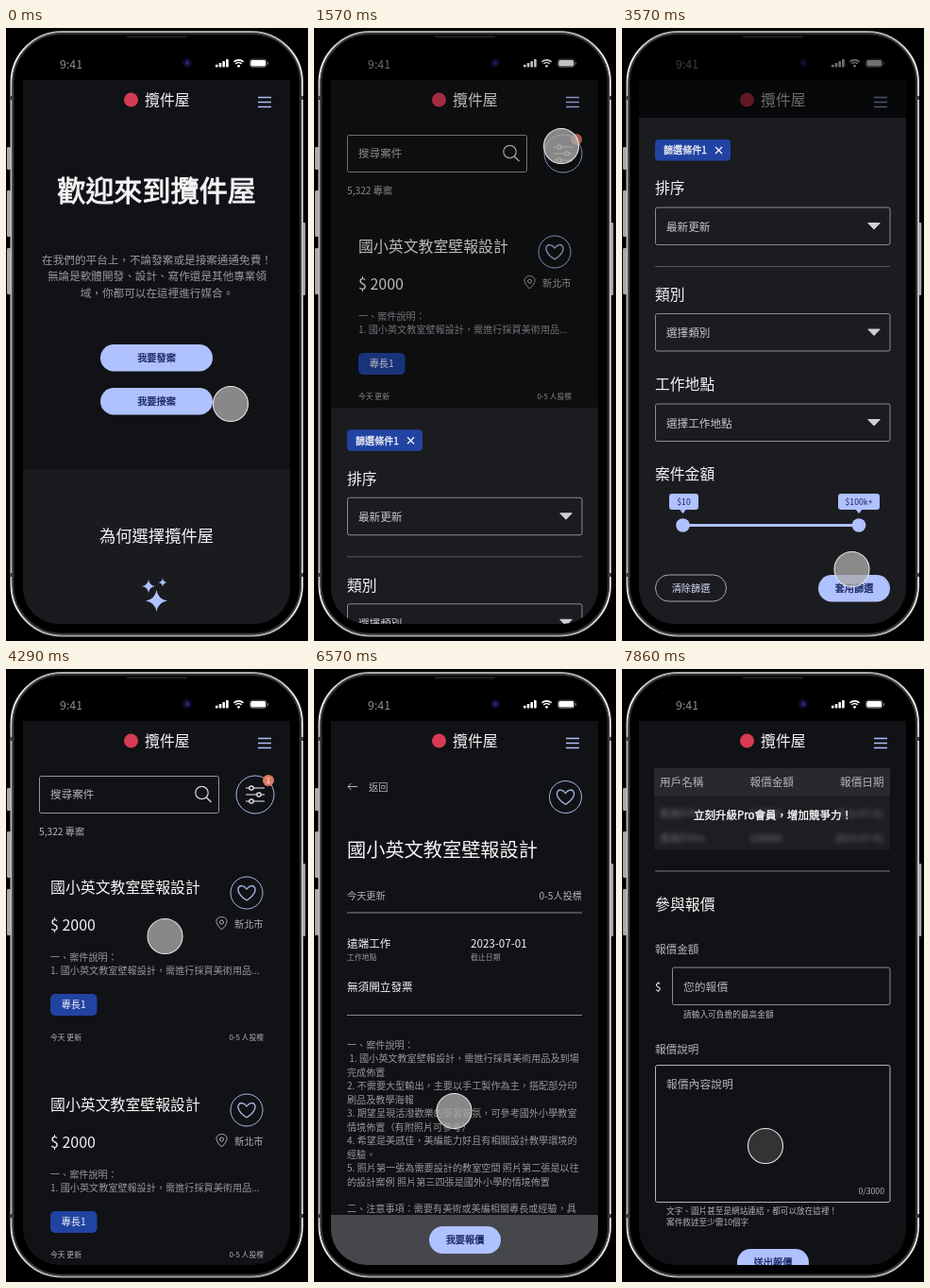
An HTML page with a canvas for the animation above (8 s loop, 320 by 649 pixels).

```html
<!DOCTYPE html>
<html lang="zh-Hant">
<head>
<meta charset="utf-8">
<style>
html, body { margin: 0; width: 100%; height: 100%; overflow: hidden; background: #000; }
canvas { display: block; width: 320px; height: 649px; }
</style>
</head>
<body>
<canvas id="stage"></canvas>
<script>
const LOOP = 8000;
const BRAND = '攬件屋';
const PAGE = '#111215', PANEL = '#1b1c20', LILAC = '#b0c1ff', NAVY = '#14265c';
const CHIP = '#2143a2', WHITE = '#f4f4f6', SOFT = '#b4b4b8', GRAY = '#98989d', EDGE = '#8c8c91';
const JOB = '國小英文教室壁報設計';

const canvas = document.getElementById('stage');
const ratio = window.devicePixelRatio || 1;
canvas.width = 320 * ratio;
canvas.height = 649 * ratio;
const c = canvas.getContext('2d');

const clamp = v => Math.max(0, Math.min(1, v));
const ramp = (t, from, to) => {
  const p = clamp((t - from) / (to - from));
  return p * p * (3 - 2 * p);
};

// y is the middle of the glyphs; medium text gets a hairline outline
function text(s, x, y, size, color = WHITE, align = 'left', medium = false) {
  c.font = `400 ${size}px "Noto Sans CJK TC", "Noto Sans CJK", sans-serif`;
  c.textAlign = align;
  c.fillStyle = color;
  c.fillText(s, x, y + size * 0.375);
  if (medium) {
    c.strokeStyle = color;
    c.lineWidth = size * 0.03;
    c.strokeText(s, x, y + size * 0.375);
  }
}

function box(x, y, w, h, r, fill, stroke, lw = 1) {
  c.beginPath();
  c.roundRect(x, y, w, h, r);
  if (fill) { c.fillStyle = fill; c.fill(); }
  if (stroke) { c.strokeStyle = stroke; c.lineWidth = lw; c.stroke(); }
}

function disc(x, y, r, fill, stroke, lw = 1) {
  c.beginPath();
  c.arc(x, y, r, 0, 7);
  if (fill) { c.fillStyle = fill; c.fill(); }
  if (stroke) { c.strokeStyle = stroke; c.lineWidth = lw; c.stroke(); }
}

function line(pts, color, lw = 1) {
  c.beginPath();
  for (let i = 0; i < pts.length; i += 2) c.lineTo(pts[i], pts[i + 1]);
  c.strokeStyle = color;
  c.lineWidth = lw;
  c.stroke();
}

function tri(x, y, w, h, color) {
  c.beginPath();
  c.moveTo(x - w / 2, y);
  c.lineTo(x + w / 2, y);
  c.lineTo(x, y + h);
  c.closePath();
  c.fillStyle = c.strokeStyle = color;
  c.lineJoin = 'round';
  c.lineWidth = 1;
  c.fill();
  c.stroke();
}

function pill(x, y, w, h, label) {
  box(x, y, w, h, h / 2, LILAC);
  text(label, x + w / 2, y + h / 2, 10.2, NAVY, 'center', true);
}

function star(x, y, r) {
  c.beginPath();
  c.moveTo(x, y - r);
  for (let i = 1; i <= 4; i++) {
    const a = i * Math.PI / 2, m = a - Math.PI / 4;
    c.quadraticCurveTo(x + Math.sin(m) * r * 0.2, y - Math.cos(m) * r * 0.2,
      x + Math.sin(a) * r, y - Math.cos(a) * r);
  }
  c.fillStyle = LILAC;
  c.fill();
}

function like(x, y) {
  disc(x, y, 17, null, '#a9b6e8');
  c.beginPath();
  c.moveTo(x, y + 8);
  c.bezierCurveTo(x - 17, y - 3, x - 6, y - 13, x, y - 4);
  c.bezierCurveTo(x + 6, y - 13, x + 17, y - 3, x, y + 8);
  c.lineWidth = 1.3;
  c.stroke();
}

function fillPage() {
  c.fillStyle = PAGE;
  c.fillRect(18, 55, 283, 577);
}

function home() {
  fillPage();
  text('歡迎來到' + BRAND, 159.5, 172, 30.1, WHITE, 'center', true);
  ['在我們的平台上，不論發案或是接案通通免費！', '無論是軟體開發、設計、寫作還是其他專業領', '域，你都可以在這裡進行媒合。']
    .forEach((s, i) => text(s, 160, 245.5 + i * 17.6, 11.62, GRAY, 'center'));
  pill(100, 335, 119, 28.5, '我要發案');
  pill(100, 381, 119, 28.5, '我要接案');
  c.fillStyle = '#1a1b1f';
  c.fillRect(18, 467, 283, 165);
  text('為何選擇' + BRAND, 159.5, 537.5, 17.3, WHITE, 'center');
  star(151, 591, 7);
  star(166, 587, 4.5);
  star(159.5, 606.5, 11.5);
}

function card(dy) {
  c.save();
  c.translate(0, dy);
  text(JOB, 47, 231, 15.9);
  like(255, 237);
  text('$ 2000', 47, 271, 16);
  c.beginPath();
  c.moveTo(228.5, 276);
  c.bezierCurveTo(218, 266, 225, 262.5, 228.5, 262.5);
  c.bezierCurveTo(232, 262.5, 239, 266, 228.5, 276);
  c.strokeStyle = SOFT;
  c.lineWidth = 1;
  c.stroke();
  disc(228.5, 268, 2, null, SOFT);
  text('新北市', 272.5, 270, 10.2, SOFT, 'right');
  text('一、案件說明：', 47, 305, 10.15, GRAY);
  text('1. ' + JOB + '，需進行採買美術用品...', 47, 319.5, 10.15, GRAY);
  box(47, 344, 49.5, 23, 5, CHIP);
  text('專長1', 71.7, 355.5, 10.2, WHITE, 'center');
  text('今天 更新', 47, 390.5, 7.8, SOFT);
  text('0-5 人投標', 273, 390.5, 7.8, SOFT, 'right');
  c.restore();
}

function listing() {
  fillPage();
  box(35.5, 113.5, 190, 39, 2, null, '#97979b');
  text('搜尋案件', 47, 133, 11.62, SOFT);
  disc(207.5, 131, 6.7, null, '#d8d8db', 1.2);
  line([212.3, 136, 217.5, 141], '#d8d8db', 1.4);
  disc(264, 133, 20, null, '#a9b6e8');
  [126, 133, 140].forEach((y, i) => {
    line([254, y, 274, y], WHITE, 1.2);
    disc(i == 1 ? 268 : 260, y, 2.2, PAGE, WHITE, 1.2);
  });
  disc(278, 118, 6, '#dc7b64');
  text('1', 278, 118, 8, WHITE, 'center');
  text('5,322 專案', 35, 172.5, 10.2, SOFT);
  card(0);
  card(230);
}

function select(y, label) {
  box(35.5, y, 248.5, 39.5, 2, null, EDGE);
  text(label, 47, y + 20.5, 11.62, '#c9c9cc');
  tri(267, y + 16.5, 12.5, 6.5, '#cfcfd2');
}

function bubble(x, knob, w, label) {
  box(x, 493, w, 17, 3, LILAC);
  tri(knob, 509.5, 6, 4, LILAC);
  text(label, x + w / 2, 501.5, 8.7, NAVY, 'center');
  disc(knob, 526.5, 7.3, LILAC);
}

function menu() {
  box(35.5, 230, 248.5, 187, 1, '#1c1d20', '#b9b9bd');
  c.fillStyle = '#363638';
  c.fillRect(36, 283, 247.5, 35);
  [276.5, 323.5, 370.5].forEach(y => line([36, y, 283.5, y], '#4b4b4f'));
  text('最相關', 69, 254, 11.62, '#c9c9cc');
  text('最近更新', 69, 301, 11.62, WHITE, 'left', true);
  text('專案預算(高至低)', 69, 348, 11.62, '#c9c9cc');
  text('專案預算(低至高)', 72, 395, 11.62, '#c9c9cc');
  line([46, 300, 50, 304, 58, 296], WHITE, 1.2);
}

function sheet(dy, menuAlpha) {
  c.save();
  c.translate(0, dy);
  c.fillStyle = PANEL;
  c.fillRect(18, 95, 283, 537);
  box(35, 118, 80, 22.5, 4, CHIP);
  text('篩選條件1', 44, 129.5, 10.1, WHITE, 'left', true);
  line([99, 126, 106, 133], WHITE, 1.2);
  line([106, 126, 99, 133], WHITE, 1.2);
  text('排序', 35, 169.5, 15.8);
  select(190, '最新更新');
  line([35, 252.5, 284, 252.5], '#55555a');
  text('類別', 35, 282.5, 15.8);
  select(302.5, '選擇類別');
  text('工作地點', 35, 377.5, 15.8);
  select(398, '選擇工作地點');
  text('案件金額', 35, 472.5, 15.8);
  line([64, 526.5, 251, 526.5], LILAC, 3);
  bubble(50, 64.5, 31, '$10');
  bubble(229, 251, 44, '$100k+');
  box(35.5, 579, 75, 28, 14, null, '#a5a5ab');
  text('清除篩選', 73, 593.5, 10.2, '#d5dcfa', 'center');
  pill(208, 579, 76, 28.5, '套用篩選');
  if (menuAlpha > 0) {
    c.globalAlpha = menuAlpha;
    menu();
  }
  c.restore();
}

function form() {
  box(34, 105, 250, 86.5, 2, '#1d1e22');
  c.fillStyle = '#29292d';
  c.fillRect(34, 105, 250, 29);
  text('用戶名稱', 40, 120, 11.62, SOFT);
  text('報價金額', 135.5, 120, 11.62, SOFT);
  text('報價日期', 277.5, 120, 11.62, SOFT, 'right');
  c.save();
  c.filter = `blur(${2.6 * ratio}px)`;
  [153, 179].forEach(y => {
    text('某用戶Pro', 40, y, 10.2, '#77777c');
    text('$30000', 135.5, y, 10.2, '#77777c');
    text('2023-07-01', 277.5, y, 10.2, '#77777c', 'right');
  });
  c.restore();
  text('立刻升級Pro會員，增加競爭力！', 76, 154.5, 11.5, '#fff', 'left', true);
  line([35, 214, 284, 214], '#77777b');
  text('參與報價', 35, 249.5, 15.9);
  text('報價金額', 35, 296.5, 11.62, SOFT);
  text('$', 35, 337, 11.62);
  box(53.5, 316, 230.5, 39.5, 2, null, EDGE);
  text('您的報價', 65, 336.5, 11.8, SOFT);
  text('請輸入可負擔的最高金額', 65, 365.5, 8.7, SOFT);
  text('報價說明', 35, 403, 11.62, SOFT);
  box(35.5, 419.5, 248.5, 145, 2, null, '#b5b5b9');
  text('報價內容說明', 47, 440, 11.8, SOFT);
  text('0/3000', 278, 553, 8.7, SOFT, 'right');
  text('文字、圖片甚至是網站連結，都可以放在這裡！', 47, 574, 8.65, SOFT);
  text('案件敘述至少需10個字', 47, 585.5, 8.65, SOFT);
  pill(122, 614, 76, 28.5, '送出報價');
}

const BODY = [
  '一、案件說明：',
  ' 1. ' + JOB + '，需進行採買美術用品及到場',
  '完成佈置',
  '2. 不需要大型輸出，主要以手工製作為主，搭配部分印',
  '刷品及教學海報',
  '3. 期望呈現活潑歡樂的學習氣氛，可參考國外小學教室',
  '情境佈置（有附照片可參考）',
  '4. 希望是美感佳，美編能力好且有相關設計教學環境的',
  '經驗。',
  '5. 照片第一張為需要設計的教室空間 照片第二張是以往',
  '的設計案例 照片第三四張是國外小學的情境佈置',
  '',
  '二、注意事項：需要有美術或美編相關專長或經驗，具'
];

function detail(t) {
  const span = 520, scroll = span * ramp(t, 6650, 7780);
  const member = t > 5700;
  fillPage();
  c.save();
  c.translate(0, -scroll);
  line([46, 124.5, 36, 124.5], SOFT);
  line([39.5, 121, 36, 124.5, 39.5, 128], SOFT);
  text('返回', 58, 125.5, 10.2, SOFT);
  like(266.5, 135.5);
  text(JOB, 35, 191.5, 20.2);
  text(member ? '今天更新' : '今天 更新', 35, 240, 10.2, SOFT);
  text('0-5人投標', 284, 240, 10.2, SOFT, 'right');
  line([35, 258, 284, 258], '#88888c');
  text('遠端工作', 35, 291, 11.62);
  text('2023-07-01', 166, 291, 11.62);
  text('工作地點', 35, 305, 7.9, GRAY);
  text('截止日期', 166, 305, 7.9, GRAY);
  text('無須開立發票', 35, 336.5, 11.62);
  line([35, 366.5, 284, 366.5], '#88888c');
  BODY.forEach((s, i) => text(s, 35, 398 + i * 14.47, 10.15, GRAY));
  if (scroll > 0) {
    c.translate(0, span);
    form();
  }
  c.restore();

  const hide = ramp(t, 6850, 7150);
  if (hide < 1) {
    c.save();
    c.translate(0, 54 * hide);
    c.fillStyle = '#46474d';
    c.fillRect(18, 578, 283, 54);
    pill(122, 590, 76, 29, member ? '我要報價' : '登入報價');
    c.restore();
  }
}

function statusBar() {
  c.fillStyle = '#000';
  c.fillRect(18, 15, 283, 40);
  text('9:41', 57, 38, 12.4, '#8c8c90');
  disc(192, 37, 4.8, '#0e0e30');
  disc(192, 37, 2, '#2a2a7c');
  for (let i = 0; i < 4; i++) box(222 + i * 3.7, 38.8 - i * 1.9, 2.6, 2.7 + i * 1.9, 0.7, '#fff');
  c.strokeStyle = '#fff';
  c.lineWidth = 1.6;
  [7.6, 4.8].forEach(r => {
    c.beginPath();
    c.arc(246.5, 41.5, r, -2.3, -0.84);
    c.stroke();
  });
  disc(246.5, 40.3, 1.4, '#fff');
  box(258.5, 33.2, 17.5, 8.2, 2.4, null, '#777', 0.8);
  box(259.3, 34, 15.9, 6.6, 1.7, '#fff');
  box(277, 36, 1, 2.8, 0.5, '#777');
}

function header() {
  c.fillStyle = PAGE;
  c.fillRect(18, 55, 283, 40);
  disc(132.5, 76, 7.5, '#d63a55');
  text(BRAND, 147, 76.5, 15.9);
  [73.5, 78.5, 83.5].forEach(y => line([267, y, 281, y], '#aebdfb', 1.4));
}

function phone() {
  const side = '#a9a9ab';
  [[126, 24], [172, 49], [233, 49]].forEach(([y, h]) => box(1, y, 4, h, 1.2, side));
  box(314, 206, 3.2, 77, 1.2, side);
  // polished rim: brightest around the corners
  const rim = c.createLinearGradient(0, 3, 0, 645);
  [[0, '#a8a8aa'], [0.05, '#f2f2f2'], [0.12, '#bcbcbe'], [0.88, '#bcbcbe'], [0.95, '#f2f2f2'], [1, '#a8a8aa']]
    .forEach(([at, color]) => rim.addColorStop(at, color));
  box(5.5, 4, 308.5, 639.5, 54, '#000', rim, 2);
  box(7.5, 6, 304.5, 635.5, 52, null, '#3c3c3e', 1.6);
  box(128, 8, 64, 2.5, 1.2, '#1d1d1f');
  [72, 577].forEach(y => {
    c.fillStyle = '#39393b';
    c.fillRect(4.5, y, 4, 4);
    c.fillRect(311, y, 4, 4);
  });
}

const PATH = [
  [0, 238, 398], [350, 200, 398], [600, 200, 398], [1250, 262, 125], [1600, 262, 125],
  [2100, 228, 215], [2430, 228, 229], [2710, 200, 300], [3000, 200, 300], [3500, 243.5, 573],
  [3850, 243.5, 573], [4400, 160, 250], [4650, 160, 250], [5290, 163, 541], [5550, 160, 603],
  [5900, 160, 603], [6450, 148.5, 468], [6650, 148.5, 468], [7860, 152, 505], [8000, 152, 505]
];

function pointer(t) {
  const i = PATH.findIndex(k => k[0] > t);
  const [t0, x0, y0] = PATH[i - 1], [t1, x1, y1] = PATH[i];
  const p = ramp(t, t0, t1);
  const alpha = 0.78 - 0.56 * ramp(t, 7500, 7840);
  disc(x0 + (x1 - x0) * p, y0 + (y1 - y0) * p, 18.5, `rgba(170,170,170,${alpha})`, '#e4e4e4', 1.1);
}

function fade(alpha, draw) {
  if (alpha <= 0) return;
  c.save();
  c.globalAlpha = alpha;
  draw();
  c.restore();
}

function render(t) {
  c.setTransform(ratio, 0, 0, ratio, 0, 0);
  c.fillStyle = '#000';
  c.fillRect(0, 0, 320, 649);
  phone();

  c.save();
  c.beginPath();
  c.roundRect(18, 15, 283, 616, 38);
  c.clip();
  const toList = ramp(t, 450, 750), toDetail = ramp(t, 4550, 4850);
  if (toList < 1) home();
  if (toDetail < 1) fade(toList, listing);
  fade(toDetail, () => detail(t));
  header();
  statusBar();

  const open = ramp(t, 1408, 1770) * (1 - ramp(t, 3680, 4000));
  if (open > 0) {
    c.fillStyle = `rgba(0,0,0,${0.56 * open})`;
    c.fillRect(18, 15, 283, 617);
    sheet(535 * (1 - open), ramp(t, 2150, 2350) * (1 - ramp(t, 3000, 3200)));
  }
  pointer(t);
  c.restore();
}

function tick(now) {
  render(now % LOOP);
  requestAnimationFrame(tick);
}
requestAnimationFrame(tick);
</script>
</body>
</html>
```
